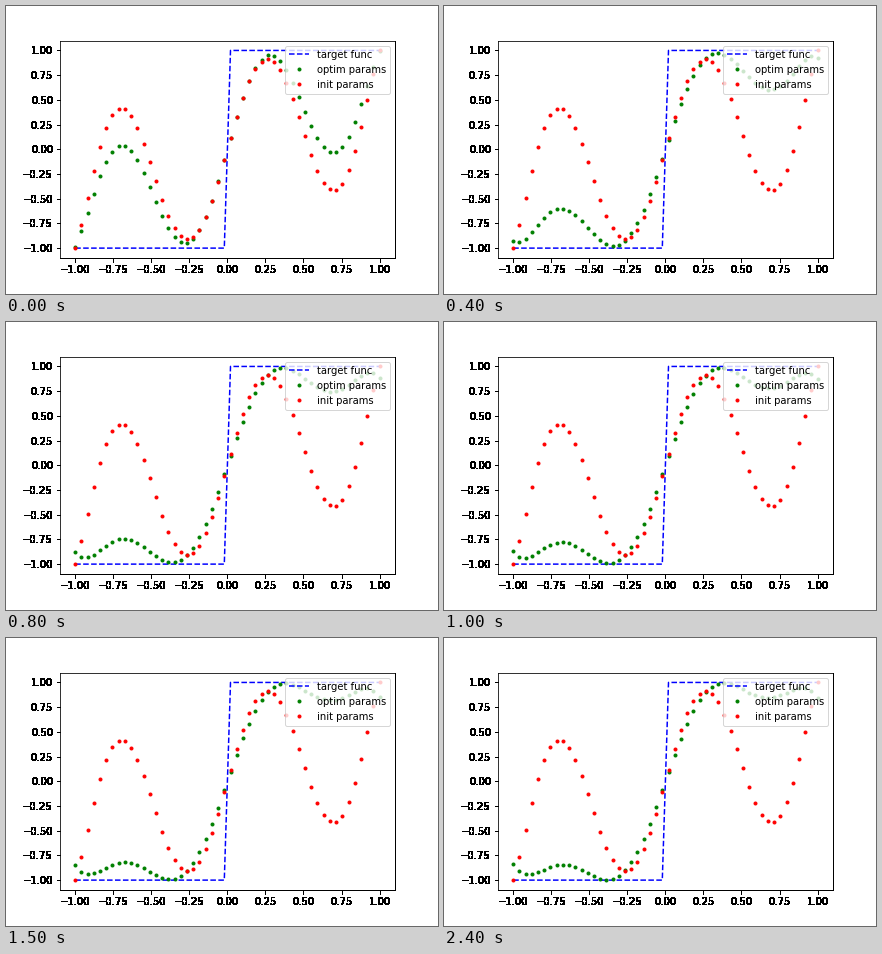
These frames come from a looping animation (432 by 288 pixels, 2500 ms). A matplotlib script:

```python
import numpy as np
import matplotlib.pyplot as plt
from matplotlib.animation import FuncAnimation
from numpy.polynomial.chebyshev import chebvander

FRAMES, INTERVAL = 25, 100
x = np.linspace(-1, 1, 50)
knots = -x[:21:4]


def basis(u):
    """Odd Chebyshev polynomials up to degree 9."""
    return chebvander(u, 9)[:, 1::2]


def curve(*values):
    """Odd polynomial through key values, running from x = 1 inwards."""
    coefs = np.linalg.lstsq(basis(knots), np.array(values), rcond=None)[0]
    return basis(x) @ coefs


init = curve(1, -.02, -.405, .13, .80, .81)
limit = curve(.838, .925, .85, .93, .99, .708)
slow = curve(.184, -.27, -.425, -.225, -.016, .069)
fast = curve(-.032, -.38, -.455, -.325, -.084, .043)


def optim(step):
    """Training settles in a fast and a slow exponential."""
    return limit + fast * np.exp(-.62 * step) + slow * np.exp(-.18 * step)


def harden(img, dpi):
    """Make every touched pixel solid black."""
    solid = np.zeros_like(img)
    solid[..., 3] = img[..., 3] > 0
    return solid, 0, 0


fig = plt.figure(figsize=(6, 4), dpi=72, facecolor="white")
ax = fig.add_axes([.125, .125, .775, .755])
ax.set(xlim=(-1.1, 1.1), ylim=(-1.1, 1.1))
for axis in (ax.xaxis, ax.yaxis):
    axis.set_ticks(np.linspace(-1, 1, 9))
    axis.set_agg_filter(harden)
ax.spines[["right", "bottom"]].set_linewidth(1)

ax.plot(x, np.sign(x), "b--", label="target func")
dots, = ax.plot(x, optim(0), "g.", label="optim params")
ax.plot(x, init, "r.", label="init params")
ax.legend(loc="upper right")


def update(step):
    dots.set_ydata(optim(step))
    return dots,


anim = FuncAnimation(fig, update, frames=FRAMES, interval=INTERVAL,
                     repeat=True, repeat_delay=0)
plt.show()
```
